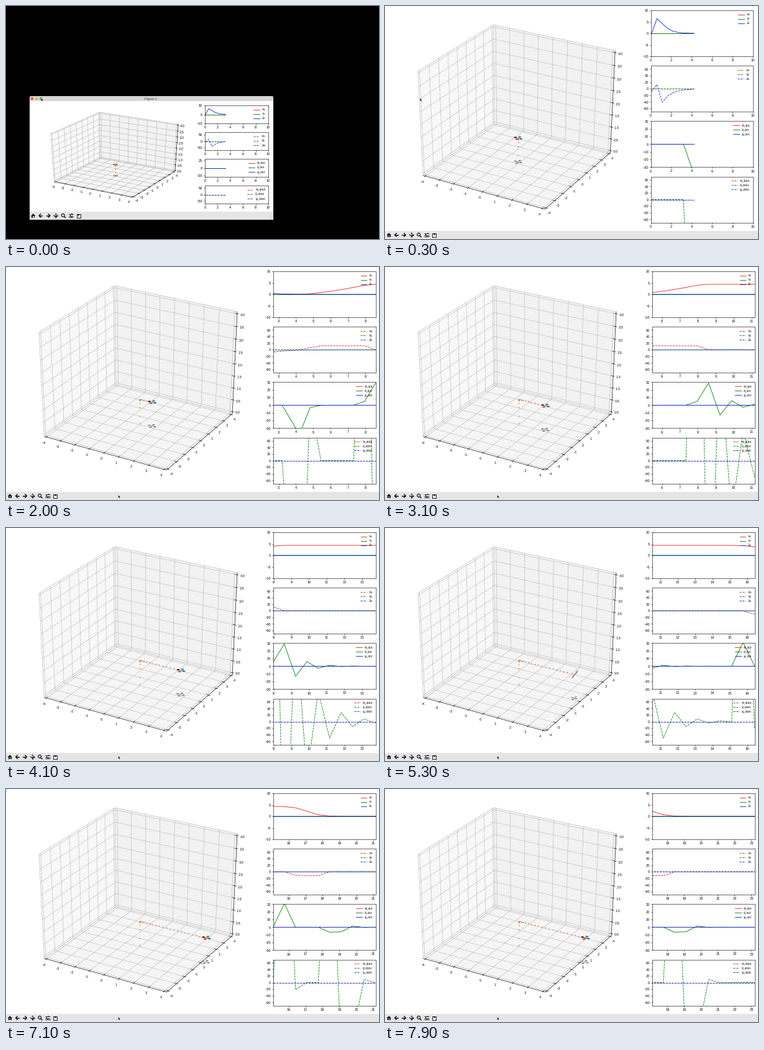
These frames come from a looping animation (600x375 px, 8 s). A matplotlib script:

```python
import numpy as np
import matplotlib.pyplot as plt
from matplotlib.animation import FuncAnimation
from matplotlib.collections import LineCollection
from matplotlib.patches import Circle, FancyBboxPatch, Polygon, Rectangle
from matplotlib.ticker import MultipleLocator

W, H, FPS = 600, 375, 10
FRAMES = 8 * FPS
PX = 0.72  # points per pixel at 100 dpi

plt.rcParams.update({
    "font.family": "Liberation Sans", "font.size": 5.7 * PX, "text.hinting": "none",
    "axes.linewidth": 0.42, "lines.linewidth": 0.64,
    "xtick.major.width": 0.42, "ytick.major.width": 0.42,
    "xtick.major.size": 1.4, "ytick.major.size": 1.4,
    "xtick.major.pad": 1.3, "ytick.major.pad": 1.3,
    "toolbar": "None",
})


def ramp(t, a, b):
    return np.clip((t - a) / (b - a), 0, 1)


def bursts(*events):
    """Sum of (sample, amplitude, decay) impulses, each ringing down geometrically."""
    out = np.zeros(N)
    for k, amp, decay in events:
        out[k:] += amp * float(decay) ** np.arange(N - k)
    return out


# ---------- flight model, one value per sample ----------
N = 37
n = np.arange(N) - 7
T = 4.2 + np.where(n < 0, 0.52 * n - 0.48, 0.62 * n + 0.0012 * n**2)
START = 210 + (T - 4.2) * 400  # ms at which each sample appears

# climb to one metre
s, b = T - T[0], 2.1
zero = np.zeros(N)
zv = 36.6 * s * np.exp(-b * s)
pos_z = 1 - (1 + b * s) * np.exp(-b * s)
za = np.where(T > 1, -41 * np.exp(-1.15 * (T - 1.12)), 13)
za[0] = -8

# forward flight: speed up, cruise, brake
xv = 4.35 * ramp(T, 4.2, 8.2)**1.5 / (1 + np.exp(2.6 * (T - 17.1)))
xa = 12 * (ramp(T, 4.2, 5.4) - ramp(T, 8, 8.5) - ramp(T, 15.75, 16.5) + ramp(T, 17.75, 18.4))
pos_x = np.interp(T, [4.4, 6.6, 8.6, 16.4, 17.8, 20], [0, 0.27, 0.85, 3.79, 4.25, 4.48])
pitch = -np.arctan(xa / 9.8)

td = bursts((7, -38, 0.08), (13, 5, 0), (14, 29, -0.45), (25, 31, 0),
            (29, -6.5, 0), (30, -6, -0.25))
tdd = bursts((7, -690, 0), (8, 180, 0), (13, 1000, -0.55), (25, 700, -0.03),
             (29, 600, 0), (30, -200, 0), (31, -160, -0.06))

# ---------- stage ----------
fig = plt.figure(figsize=(W / 100, H / 100), dpi=100, facecolor="white")
stage = fig.add_axes([0, 0, 1, 1])
stage.set_xlim(0, W)
stage.set_ylim(H, 0)
stage.set_autoscale_on(False)
stage.axis("off")


def add(patch, z=1):
    patch.set_zorder(z)
    return stage.add_patch(patch)


def toolbar(ox, oy, width):
    parts = [add(Rectangle((ox, oy), width, 13, fc="#e5e5e5", ec="none"))]
    ink = "#111111"

    def stroke(cx, pts, lw=1.2):
        xy = np.array(pts, float) + (cx, oy + 6.5)
        parts.extend(stage.plot(*xy.T, color=ink, lw=lw * PX, zorder=2,
                                solid_capstyle="butt"))

    def shape(cx, pts):
        xy = np.array(pts, float) + (cx, oy + 6.5)
        parts.append(add(Polygon(xy, fc=ink, ec="none"), 2))

    def box(cx, x, y, w, h):
        parts.append(add(Rectangle((cx + x, oy + 6.5 + y), w, h, fc=ink, ec="none"), 2))

    home, back, fwd, move, zoom, tune, save = ox + 6.3 + 12.15 * np.arange(7)
    shape(home, [(-3.8, 0.4), (0, -3.3), (3.8, 0.4)])
    for x in (-2.7, 0.8):
        box(home, x, 0.2, 1.9, 3)
    for cx, d in ((back, 1), (fwd, -1)):
        stroke(cx, [(3.4 * d, 0), (-2.8 * d, 0)], 1.5)
        stroke(cx, [(0.2 * d, -3), (-2.8 * d, 0), (0.2 * d, 3)], 1.5)
    stroke(move, [(-3, 0), (3, 0)])
    stroke(move, [(0, -3), (0, 3)])
    tip = np.array([(4, 0), (2.2, -1.6), (2.2, 1.6)])
    for _ in range(4):
        shape(move, tip)
        tip = tip[:, ::-1] * (-1, 1)
    parts.append(add(Circle((zoom - 0.7, oy + 5.8), 2.4, fc="none", ec=ink, lw=0.85), 2))
    stroke(zoom, [(0.9, 0.9), (3.6, 3.6)], 1.5)
    for y, knob in ((-2.4, 1.4), (0, -1.4), (2.4, 0.8)):
        stroke(tune, [(-3.6, y), (3.6, y)], 0.9)
        box(tune, knob - 0.6, y - 1.1, 1.2, 2.2)
    stroke(save, [(-3, -3), (3, -3), (3, 3), (-3, 3), (-3, -3)], 0.9)
    box(save, -1.7, -3, 3.2, 2)
    box(save, -1.7, 1.2, 3.4, 0.7)
    return parts


full_parts = toolbar(0, 362, W)
small_parts = [
    add(Rectangle((0, 0), W, H, fc="black", ec="none"), 0),
    add(FancyBboxPatch((39, 146), 390, 20, boxstyle="round,pad=1,rounding_size=2",
                       fc="#d6d6d6", ec="none"), 0.1),
    add(Rectangle((37.5, 153), 392, 180, fc="white", ec="none"), 0.2),
    stage.text(233, 149.2, "Figure 1", size=5.4 * PX, color="#333333",
               ha="center", va="center"),
]
small_parts += [add(Circle((42 + 7.25 * i, 149), 2.2, fc=c, ec="none"), 2)
                for i, c in enumerate(("#f0524a", "#f2b632", "#2fb53c"))]
small_parts += toolbar(37.5, 331, 392)

# ---------- 3D view ----------
AZ, EL = np.radians((-60, 30))
F = np.array([np.cos(EL) * np.cos(AZ), np.cos(EL) * np.sin(AZ), np.sin(EL)])
R = np.array([-np.sin(AZ), np.cos(AZ), 0])
U = np.cross(F, R)


def project(p, cam):
    cx, cy, sx, sy = cam
    d = np.asarray(p, float) / (8, 8, 4) - (0, 0, 0.5)
    k = 10 / (10 - d @ F)
    return np.stack([cx + sx * k * (d @ R), cy - sy * k * (d @ U)], axis=-1)


hi = 4 + 1 / 6
lo, zlo, zhi = -hi, -1 / 12, 4 + 1 / 12
A, B, C, D = [(x, y, zlo) for x, y in ((lo, lo), (hi, lo), (hi, hi), (lo, hi))]
A2, C2, D2 = [(p[0], p[1], zhi) for p in (A, C, D)]
PANES = {"#f8f8f8": [A, D, D2, A2], "#f2f2f2": [D, C, C2, D2], "#f5f5f5": [A, B, C, D]}
AXES = [[A, B], [B, C], [C, C2]]

grid = [[A, A2], [A2, D2], [D2, C2], [D, D2], [A, D], [D, C]]
ticks, labels = [], []
for v in range(-4, 5):
    grid += [[(v, lo, zlo), (v, hi, zlo)], [(v, hi, zlo), (v, hi, zhi)],
             [(lo, v, zlo), (hi, v, zlo)], [(lo, v, zlo), (lo, v, zhi)]]
    ticks += [[(v, lo - 0.1, zlo), (v, lo + 0.13, zlo)],
              [(hi - 0.13, v, zlo), (hi + 0.1, v, zlo)]]
    name = str(v).replace("-", "\u2212")
    labels += [(name, (v, lo, zlo), (-4.5, 9.5)), (name, (hi, v, zlo), (5, 8))]
for v in np.arange(0, 4.1, 0.5):
    grid += [[(lo, lo, v), (lo, hi, v)], [(lo, hi, v), (hi, hi, v)]]
    ticks.append([(hi - 0.13, hi, v), (hi + 0.1, hi, v)])
    labels.append((f"{v:.1f}", (hi, hi, v), (8.5, 2)))

panes = [add(Polygon(np.zeros((4, 2)), fc=c, ec="none"), 1) for c in PANES]


def lines(color, lw, z):
    return stage.add_collection(LineCollection([], colors=color, linewidths=lw, zorder=z),
                                autolim=False)


grid_lines = lines("#b0b0b0", 0.38, 2)
axis_lines = lines("black", 0.45, 3)
arm_lines = lines("#777777", 0.4, 4)
texts = [stage.text(0, 0, name, size=5.6 * PX, ha="center", va="center", color="#111111")
         for name, _, _ in labels]

ROTORS = [((-1, 0), "#141414"), ((0, 1), "#0c8c1e"), ((0, -1), "#ea2a1c"), ((1, 0), "#1644e0")]
ARM, RAD = 0.19, 0.085
shadows = [add(Polygon(np.zeros((3, 2)), fc="#858585", ec="none"), 4) for _ in ROTORS]
discs = [add(Polygon(np.zeros((3, 2)), fc=c, ec="none"), 6) for _, c in ROTORS]
trail, = stage.plot([], [], "s", ms=1, mfc="#d0651e", mec="none", zorder=5)
ring = np.linspace(0, 2 * np.pi, 24, endpoint=False)

arrow = np.array([(0, 0), (0, 5.2), (1.2, 4.1), (2, 5.9), (2.8, 5.5), (2.1, 3.8), (3.7, 3.7)])
cursor = add(Polygon(arrow, fc="black", ec="white", lw=0.3), 9)


def draw_view(k, cam, pad):
    for patch, corners in zip(panes, PANES.values()):
        patch.set_xy(project(corners, cam))
    grid_lines.set_segments(project(grid, cam))
    axis_lines.set_segments(project(AXES + ticks, cam))
    for text, (_, p, off) in zip(texts, labels):
        text.set_position(project(p, cam) + pad * np.array(off))

    cos, sin = np.cos(pitch[k]), np.sin(pitch[k])

    def body(x, y):
        return np.stack([pos_x[k] + x * cos, y, pos_z[k] + x * sin], axis=-1)

    for disc, shade, ((ux, uy), _) in zip(discs, shadows, ROTORS):
        p = body(ux * ARM + RAD * np.cos(ring), uy * ARM + RAD * np.sin(ring))
        disc.set_xy(project(p, cam))
        shade.set_xy(project(p * (1, 1, 0), cam))
    ends = ARM * np.array([[(-1, 0), (1, 0)], [(0, -1), (0, 1)]])
    arms = body(ends[..., 0], ends[..., 1])
    arm_lines.set_segments(list(project(arms, cam)) + list(project(arms * (1, 1, 0), cam)))
    path = np.stack([pos_x, zero, pos_z], axis=-1)[:k + 1]
    trail.set_data(*project(path, cam).T)


# ---------- charts ----------
GREEK = "\u03a6\u03b8\u03c8"
CHARTS = [  # names, data, y limit, tick steps (full, small), style
    (["Xv", "Yv", "Zv"], (xv, zero, zv), 10, (5, 10), "-"),
    (["Xa", "Ya", "Za"], (xa, zero, za), 70, (20, 50), "--"),
    ([g + "_dot" for g in GREEK], (zero, td, zero), 30, (10, 25), "-"),
    ([g + "_ddot" for g in GREEK], (zero, tdd, zero), 70, (20, 50), "--"),
]
charts = []
for names, data, lim, steps, style in CHARTS:
    ax = fig.add_axes([0, 0, 0.1, 0.1])
    ax.set_ylim(-lim, lim)
    curves = [ax.plot([], [], style, color=c, label=name)[0]
              for name, c in zip(names, ("#f02418", "#0a800a", "#1028e8"))]
    ax.legend(loc="upper right", fontsize=4.9 * PX, frameon=False, borderaxespad=0.55)
    charts.append((ax, curves, data, steps))


def draw_charts(k, small, rect, pitch_y, xlim):
    x, y, w, h = rect
    for i, (ax, curves, data, steps) in enumerate(charts):
        top = y + i * pitch_y
        ax.set_position([x / W, 1 - (top + h) / H, w / W, h / H])
        ax.set_xlim(*xlim)
        ax.xaxis.set_major_locator(MultipleLocator(2 if xlim[0] == 0 else 1))
        ax.yaxis.set_major_locator(MultipleLocator(steps[small]))
        for curve, vals in zip(curves, data):
            curve.set_data(T[:k + 1], vals[:k + 1])


def draw(i):
    now = i * 1000 / FPS
    small = now < 200
    k = int(np.searchsorted(START, now, side="right")) - 1
    xlim = (0, 10) if k < 10 else (T[k - 9], T[k])

    for part in small_parts:
        part.set_visible(small)
    for part in full_parts:
        part.set_visible(not small)

    if small:
        draw_view(k, (176.3, 237, 140.3, 84.8), 0.8)
        draw_charts(k, small, (320, 160, 102, 29), 43, xlim)
    else:
        # the layout shrinks when the last tick label would overflow
        gap = (xlim[1] % 1) / (xlim[1] - xlim[0]) * 165
        f = 1 - max(0, 2.8 - gap) / 595
        draw_view(k, (215.2 * f, 173.2, 218.3 * f, 183.8), 1)
        draw_charts(k, small, (429.6 * f, 7, 165 * f, 74), 89.2, xlim)

    u = ramp(now, 500, 1100)
    u = u * u * (3 - 2 * u)
    cursor.set_xy(arrow + (56.3 + 124.2 * u, 148.2 + 218.6 * u))
    return []


anim = FuncAnimation(fig, draw, frames=FRAMES, interval=1000 / FPS, repeat=True,
                     repeat_delay=0, blit=False)
plt.show()
```
